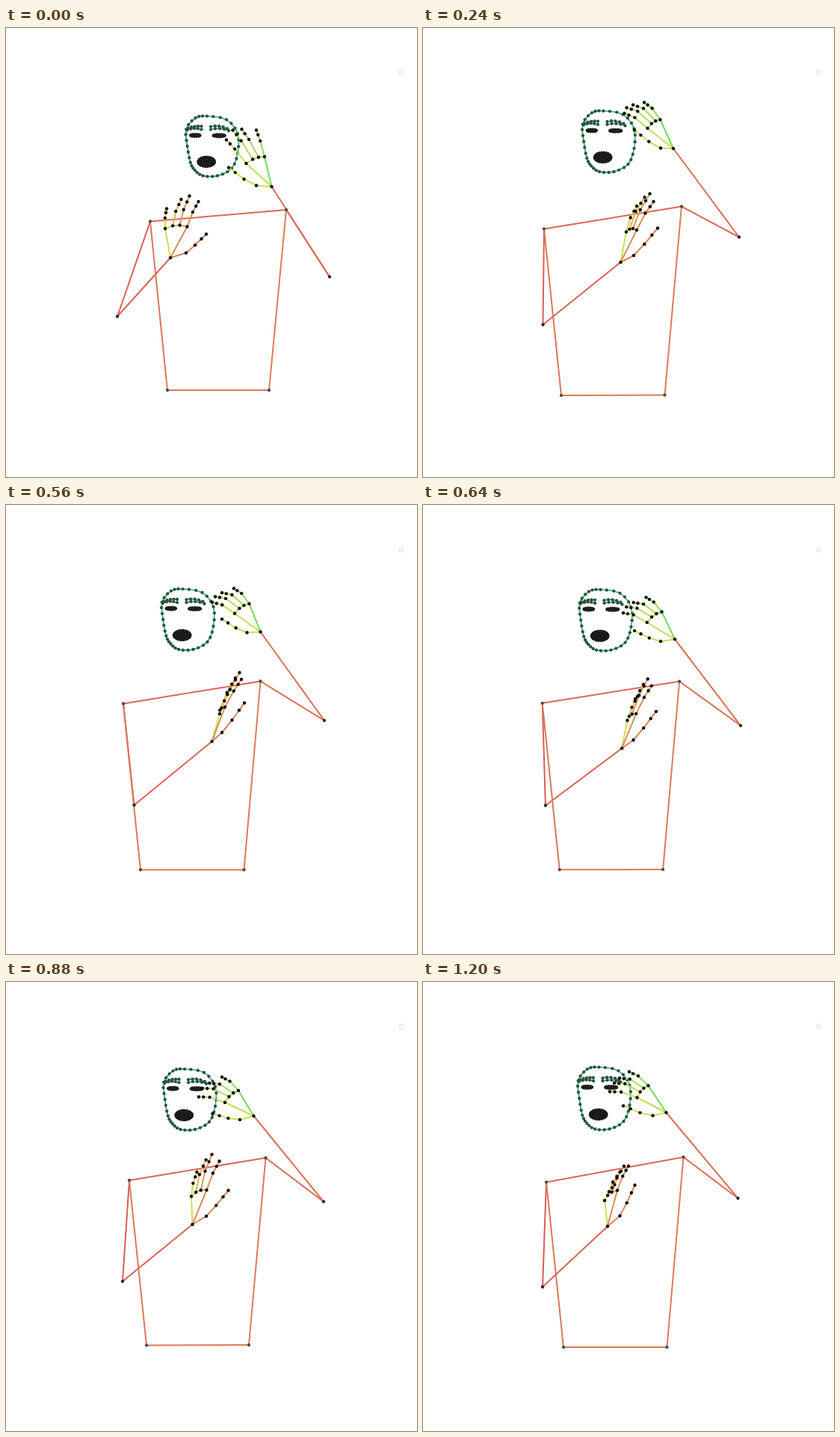
These frames come from a looping animation (550 px wide and 600 px high, 1.28 s). An HTML page:

```html
<!DOCTYPE html>
<html lang="en">
<head>
<meta charset="utf-8">
<title>Pose skeleton</title>
<style>
  html, body { margin: 0; width: 100%; height: 100%; overflow: hidden; background: #fff; }
  svg { display: block; width: 550px; height: 600px; }
</style>
</head>
<body>
<svg id="stage" viewBox="0 0 550 600"></svg>
<script>
const STEP = 80, STEPS = 16;
const KEYS = [0, 3, 5, 7, 9, 11, 15]; // steps at which the tracks have a pose

const body = {
  shoulderL: [[193, 258.5], [162, 268.5], [159.5, 268], [157, 265.5], [163, 264.5], [165, 265], [165, 267.5]],
  shoulderR: [[375, 243], [346, 238.5], [341.5, 237.5], [340.5, 235.5], [346, 236], [347.5, 235], [348.5, 234]],
  elbowL: [[149, 385.5], [160.5, 396.5], [173, 398.5], [171.5, 401], [156.5, 401.5], [156, 400], [160, 407.5]],
  elbowR: [[433, 332.5], [423, 279.5], [424, 281.5], [426, 288], [424, 300], [425, 293.5], [421.5, 289]],
  hipL: [[216, 484], [185, 491], [182.5, 488.5], [180, 487.5], [186, 487], [188, 485.5], [188, 488]],
  hipR: [[352, 484], [323.5, 490.5], [319.5, 488], [318.5, 487.5], [324, 486.5], [325, 485], [326.5, 488]]
};

const handL = {
  wrist: [[220, 307], [264.5, 313], [276, 310], [275.5, 316], [256, 332.5], [249.5, 324], [247, 326.5]],
  thumb: [[241, 300.5], [282, 304], [290, 298], [289, 304], [273.5, 322], [268, 313], [263.5, 312.5]],
  index: [[242.5, 265.5], [286, 270], [292.5, 264.5], [293, 270], [276.5, 286], [268.5, 278], [260, 278.5]],
  little: [[213, 268], [272, 272.5], [285, 272], [286, 279], [259.5, 294.5], [248, 286.5], [243, 292]],
  thumbTip: [[268, 275.5], [314, 267.5], [318, 257.5], [319, 264.5], [304, 285.5], [297.5, 278.5], [283.5, 271.5]],
  indexTip: [[257.5, 232], [308.5, 232], [315, 228.5], [315, 233], [295.5, 248.5], [285.5, 239.5], [275, 246]],
  middleTip: [[245.5, 224.5], [303.5, 221.5], [313, 221.5], [312.5, 224], [287.5, 239.5], [275.5, 230.5], [269, 246]],
  littleTip: [[215, 241.5], [286, 238], [300, 240], [299.5, 247], [272.5, 263], [255.5, 254], [256.5, 271]],
  curl: [[1], [1], [.7], [.6], [1], [1], [1.1]]
};
const handR = {
  wrist: [[355.5, 212], [335, 161], [338.5, 164.5], [340.5, 169.5], [333, 187.5], [331.5, 179], [325.5, 174.5]],
  thumb: [[335, 210.5], [318, 160.5], [321.5, 163.5], [322.5, 170.5], [313.5, 192], [313, 184], [307.5, 178.5]],
  index: [[321.5, 181], [300.5, 134], [306, 137], [306, 145], [293.5, 167], [293, 161], [286.5, 154.5]],
  little: [[346, 172], [317.5, 122.5], [323, 126.5], [325.5, 132], [313, 152], [311, 145], [301.5, 138.5]],
  thumbTip: [[298, 186.5], [283, 136.5], [288.5, 140.5], [289, 152.5], [277, 181.5], [276.5, 176], [268, 165.5]],
  indexTip: [[295, 149.5], [269.5, 114], [277.5, 122], [276, 130], [260, 157], [258, 153.5], [250, 146.5]],
  middleTip: [[303.5, 136.5], [272.5, 106.5], [281, 116.5], [280, 122.5], [264.5, 148.5], [263, 142], [256, 135]],
  littleTip: [[335, 136.5], [296, 99.5], [303, 108], [305, 111.5], [291.5, 134], [289, 127], [276, 120]],
  curl: [[.25], [1], [1.1], [1.1], [.95], [1], [1]]
};

// How each hand bends: [place along the line, sideways offset].
const bendL = {
  knuckles: [[.33, 2.8], [.65, 2.8]], ringTip: [.34, 1.4],
  joints: [[.43, .015], [.57, -.035], [.52, -.04], [.53, -.055], [.53, -.05]],
  hues: [20, 24, 30, 42, 55], palm: 65
};
const bendR = {
  knuckles: [[.385, -2.2], [.7, -2.1]], ringTip: [.38, -1.2],
  joints: [[.42, -.04], [.6, .075], [.62, .1], [.62, .115], [.59, .08]],
  hues: [66, 69, 74, 83, 96], palm: 108
};

// Left, top and height of the face; its features sit in a 70 by 82 box.
const faceBox = [[241, 117.5, 81], [213.5, 110.5, 82.5], [212, 112.5, 82], [208.5, 112, 82],
  [211, 114, 82], [211, 116, 82], [207.5, 113.5, 84]];
const oval = [[28, .3], [54, 5], [69, 24], [69, 50], [61, 71], [42, 81], [22.5, 81], [11.8, 73.5], [5.8, 63],
  [1.7, 41], [.2, 18], [12.5, 2.8]];
const brows = [ // start, end, rise
  [[2.5, 16.8], [20.5, 14], 1.2], [[1.5, 19], [20.5, 18.3], 1.8],
  [[33, 14.5], [55, 17], 2], [[33, 18.3], [57, 20], 2]
];

const hsl = hue => `hsl(${hue} 65% 60%)`;
const n = v => v.toFixed(2);
const mix = (a, b, t) => a.map((v, i) => v + (b[i] - v) * t);
const range = (count, make) => Array.from({ length: count }, (_, i) => make(i));

function hermite(p, q, m, w, u) {
  return p + u * (m + u * (3 * (q - p) - 2 * m - w + u * (2 * (p - q) + m + w)));
}

// Smooth curve through the poses of a track.
function sample(track, step) {
  const last = KEYS.length - 1;
  let k = 0;
  while (k < last - 1 && step >= KEYS[k + 1]) k++;
  const span = KEYS[k + 1] - KEYS[k];
  return track[0].map((_, c) => {
    const slope = i => {
      const a = Math.max(i - 1, 0), b = Math.min(i + 1, last);
      return (track[b][c] - track[a][c]) / (KEYS[b] - KEYS[a]) * span;
    };
    return hermite(track[k][c], track[k + 1][c], slope(k), slope(k + 1), (step - KEYS[k]) / span);
  });
}

function sampleAll(tracks, step) {
  return Object.fromEntries(Object.entries(tracks).map(([name, track]) => [name, sample(track, step)]));
}

// Closed curve through the points, with some samples per segment.
function loop(pts, per) {
  const at = i => pts[(i + pts.length) % pts.length];
  return pts.flatMap((p, i) => range(per, s => p.map((v, c) =>
    hermite(v, at(i + 1)[c], (at(i + 1)[c] - at(i - 1)[c]) / 2, (at(i + 2)[c] - v) / 2, s / per))));
}

// Point beside the line from a to b; side is in pixels.
function beside(a, b, along, side) {
  const dx = b[0] - a[0], dy = b[1] - a[1], len = Math.hypot(dx, dy) || 1;
  return [a[0] + dx * along - dy / len * side, a[1] + dy * along + dx / len * side];
}

const line = (pts, color, width = 2) =>
  `<polyline points="${pts.map(p => p.map(n).join()).join(' ')}" fill="none" stroke="${color}" stroke-width="${width}"/>`;
const dots = (pts, color, r = 2.2) =>
  pts.map(([x, y]) => `<circle cx="${n(x)}" cy="${n(y)}" r="${r}" fill="${color}"/>`).join('');

// Dense cluster of landmarks, used for the eyes and the mouth.
function cluster([x, y], rx, ry, count) {
  const ellipse = (a, b, style) => `<ellipse cx="${n(x)}" cy="${n(y)}" rx="${n(a)}" ry="${n(b)}" ${style}/>`;
  const mesh = f => ellipse(rx * f, ry * f, 'fill="none" stroke="#777" stroke-width=".6" stroke-dasharray="1 2"');
  const rim = range(count, i => {
    const a = i / count * 2 * Math.PI;
    return [x + (rx - 1.7) * Math.cos(a), y + (ry - 1.7) * Math.sin(a)];
  });
  return ellipse(rx - 1, ry - 1, 'fill="#171717"') + dots(rim, '#151515', 1.7) + mesh(.72) + mesh(.35);
}

function drawFace(step) {
  const [x, y, h] = sample(faceBox, step);
  const at = ([u, v]) => [x + u, y + v * h / 82];
  const rim = loop(oval, 3).map(at);
  const rows = brows.map(([a, b, rise]) => range(5, i => {
    const t = i / 4, [u, v] = mix(a, b, t);
    return at([u, v - rise * 4 * t * (1 - t)]);
  }));
  const edges = rim.map((p, i) =>
    line([p, rim[(i + 1) % rim.length]], i < 10 ? 'hsl(158 42% 50%)' : 'hsl(140 50% 45%)', 1.8));
  return edges.join('') + rows.map(r => line(r, 'hsl(155 40% 48%)', 1.6)).join('') +
    dots([...rim, ...rows.flat()], '#29533f', 2.15) +
    cluster(at([12.3, 26.3]), 8.3, 3.6, 14) + cluster(at([44.2, 26.6]), 9.6, 3.6, 16) +
    cluster(at([27.2, 62]), 13, 8.4, 22);
}

function drawHand(p, { knuckles, ringTip, joints, hues, palm }) {
  const [middle, ring] = knuckles.map(k => beside(p.index, p.little, ...k));
  const base = [p.thumb, p.index, middle, ring, p.little];
  const tips = [p.thumbTip, p.indexTip, p.middleTip, beside(p.middleTip, p.littleTip, ...ringTip), p.littleTip];
  const chains = base.map((a, i) => {
    const b = tips[i], [along, bow] = joints[i];
    const bent = bow * (i ? p.curl[0] : 1) * Math.hypot(b[0] - a[0], b[1] - a[1]);
    const mid = beside(a, b, along, bent);
    return [a, mid, mix(mid, b, .57), b];
  });
  return line([p.wrist, p.little], hsl(palm)) +
    [0, 1].map(i => line([p.wrist, base[i]], hsl(hues[i]))).join('') +
    [1, 2, 3].map(i => line([base[i], base[i + 1]], hsl(hues[i + 1]))).join('') +
    chains.map((c, i) => line(c, hsl(hues[i]))).join('') +
    dots([p.wrist, ...chains.flat()], '#0a0a0a');
}

function drawBody(p, wristL, wristR) {
  const limbs = [
    [p.shoulderL, p.shoulderR, 8], [p.shoulderL, p.elbowL, 3], [p.elbowL, wristL, 5],
    [p.shoulderL, p.hipL, 14], [p.shoulderR, p.hipR, 17], [p.hipL, p.hipR, 16],
    [p.shoulderR, p.elbowR, 10], [p.elbowR, wristR, 10]
  ];
  return limbs.map(([a, b, hue]) => line([a, b], hsl(hue))).join('') +
    dots([p.shoulderL, p.shoulderR, p.hipL, p.hipR], '#4c4c4c', 2.15) +
    dots([p.elbowL, p.elbowR], '#262626', 2.15);
}

const stage = document.getElementById('stage');
let shown = -1;

function render(time) {
  const step = Math.floor(time / STEP) % STEPS;
  if (step === shown) return;
  shown = step;
  const left = sampleAll(handL, step), right = sampleAll(handR, step);
  stage.innerHTML =
    '<rect x="526.5" y="56.5" width="5" height="6" rx="1" fill="#fff" stroke="#ddd"/>' +
    drawBody(sampleAll(body, step), left.wrist, right.wrist) + drawFace(step) +
    drawHand(left, bendL) + drawHand(right, bendR);
}

const start = performance.now();
function tick() {
  render(performance.now() - start);
  requestAnimationFrame(tick);
}
tick();
</script>
</body>
</html>
```
